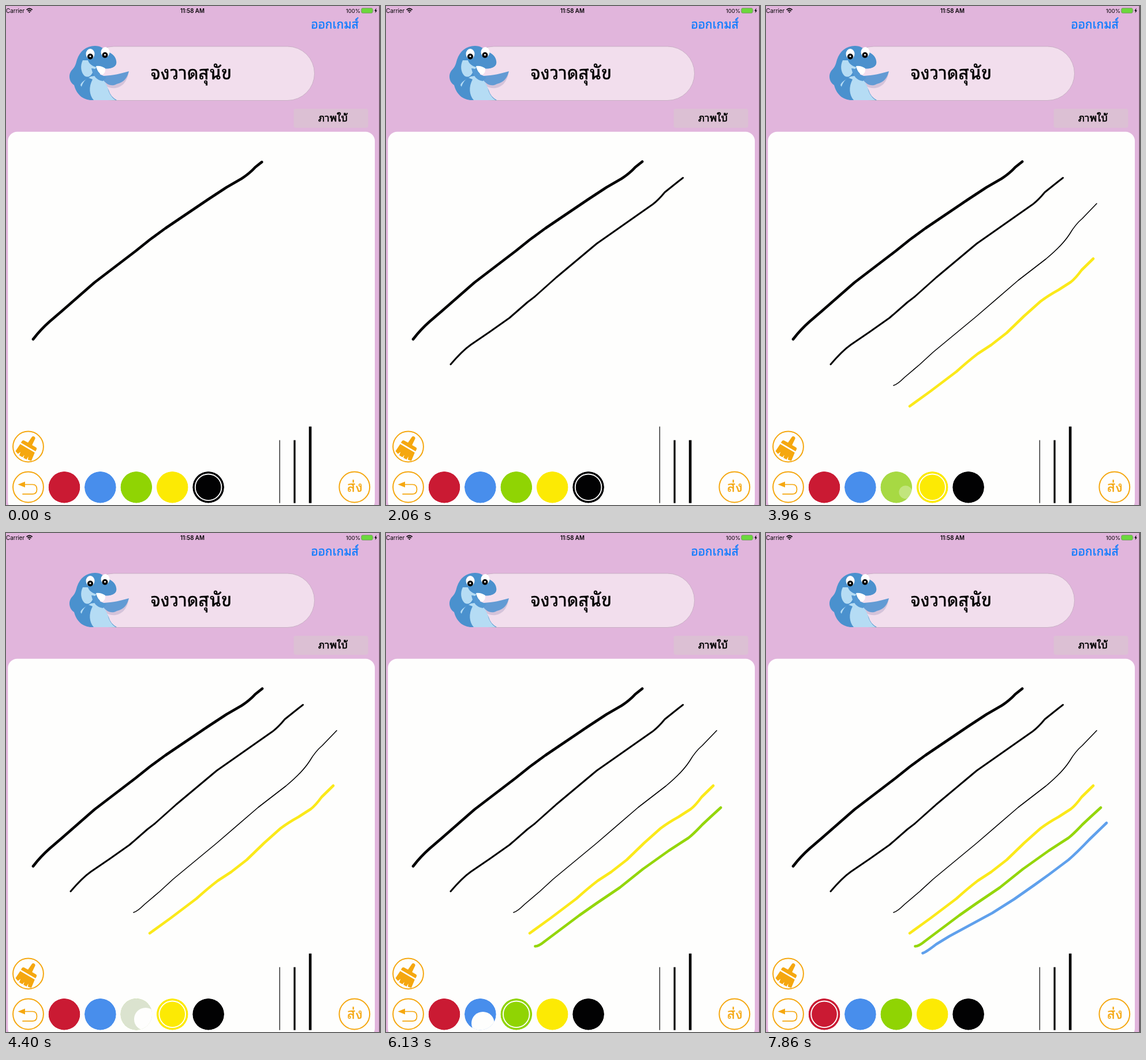
An HTML page for the animation above (8000 ms loop, 648 by 864 pixels).

```html
<!DOCTYPE html>
<html lang="th">
<meta charset="utf-8">
<title>Drawing game</title>
<style>
  html, body { margin: 0; width: 100%; height: 100%; overflow: hidden; background: #e1b5dc; }
  svg { display: block; width: 648px; height: 864px; }
  .thai { font-family: "Noto Sans Thai Looped", "Noto Looped Thai", "Noto Serif Thai", "Noto Sans Thai", "Noto Sans", sans-serif; text-anchor: middle; }
  .status text { font: 9.9px Inter, sans-serif; }
  .line { fill: none; stroke-linecap: round; stroke-linejoin: round; }
  .round { fill: none; stroke: #f5a70f; stroke-width: 2; }
</style>
<svg viewBox="0 0 648 864">
  <rect width="648" height="864" fill="#e1b5dc"/>
  <rect x="646.6" width="1.4" height="864" fill="#55454f"/>

  <g class="status">
    <text x="0" y="11.5">Carrier</text>
    <text x="302" y="11.5" style="font-weight:600;font-size:9.7px">11:58 AM</text>
    <text x="589" y="11.5" style="font-size:9.5px">100%</text>
    <g class="line" stroke="#000" stroke-width="1.7" style="stroke-linecap:butt">
      <path d="M35.6 6.6q5-4.6 10 0M37.6 8.8q3-2.8 6 0"/>
    </g>
    <path d="M39 10.2q1.6-1.3 3.2 0l-1.6 1.7z"/>
    <rect x="615.8" y="3.8" width="19.4" height="8.4" rx="2" fill="#6bd83c" stroke="#6f8f62" stroke-width=".8"/>
    <path d="M636.3 6.4q1.4 1.6 0 3.2z" fill="#6f8f62"/>
    <path d="M641.7 3.6l-3.4 4.9h2l-.7 3.8 3.4-4.9h-2z"/>
  </g>

  <text class="thai" x="570" y="39" font-size="21" fill="#0b7bff" stroke="#0b7bff" stroke-width=".3">ออกเกมส์</text>
  <rect x="140" y="70" width="394.5" height="93.5" rx="46.7" fill="#f2deed" stroke="#c9afc5"/>
  <text class="thai" x="320.5" y="127" font-size="31" stroke="#000" stroke-width=".6">จงวาดสุนัข</text>
  <rect x="498.5" y="178" width="129" height="33" rx="4" fill="#dcc0d4"/>
  <text class="thai" x="566.5" y="200" font-size="17.5" stroke="#000" stroke-width=".6">ภาพใบ้</text>

  <g id="dolphin">
    <path d="M164 126q24 6 48-8-5 21-22 24-18 2-26-16z" fill="#9d91b5" opacity=".35"/>
    <path d="M150 163c-18 0-28-11-32-26-9-6-11-19-3-27 5-5 6-10 8-17 5-15 16-24 31-24 10 0 16 5 22 10 11 4 16 12 15 20-2 8-13 11-24 9l-6 14q12 12 17 24 3 11 14 17z" fill="#4a91ce"/>
    <path d="M133 94c-5 10-3 21 3 27 7 4 12 0 15-8l6-7c-8-2-13-6-15-12z" fill="#b5dcf4"/>
    <path d="M147 122c-7 5-16 8-18 15 3 6 9 9 13 15l5 11h43c-9-6-12-14-14-22-4-10-9-16-15-21z" fill="#b5dcf4"/>
    <path d="M142 124c-11 8-14 21-12 33l16 6h6c-8-9-9-23-2-36z" fill="#4a91ce"/>
    <path d="M164 121c16 0 28-2 49-8-3 12-9 19-21 22-10 6-21 0-28-14z" fill="#629bd4"/>
    <path d="M148 108q9-1 14 10l12 5-6 7q-16-2-20-22z" fill="#5599d4"/>
    <path d="M156 104q9-1 16 4 1 9-6 11-8-4-10-15z" fill="#fff"/>
    <ellipse cx="146" cy="83" rx="7.5" ry="9" fill="#fff"/>
    <ellipse cx="172" cy="80" rx="7.500" ry="9" fill="#fff"/>
    <path d="M152 94c8-8 32-6 39 1 2 8-5 13-14 13-8 0-15-7-25-9z" fill="#4d91cd"/>
    <circle cx="146" cy="87.5" r="5"/><circle cx="171.500" cy="85" r="5"/>
    <circle cx="146" cy="87" r="1.6" fill="#fff"/><circle cx="171.500" cy="84.5" r="1.6" fill="#fff"/>
  </g>

  <rect x="3.3" y="217.7" width="635.7" height="656" rx="16" fill="#fefefd"/>
  <g id="strokes" class="line"></g>
  <g id="bars"></g>

  <circle class="round" cx="38.5" cy="763" r="26.4"/>
  <g transform="translate(38 764.5) rotate(30) scale(1.04)" fill="#f5a70f">
    <path d="M-4-7l1-12a3.2 3.2 0 0 1 6 0l1 12h7q3 0 3 3v3h-28v-3q0-3 3-3z"/>
    <path d="M-14 1.5h28l2 15-6 1-2-5v6h-6l-1-5-1 5h-6l-1-6-2 5-6-2z"/>
  </g>
  <circle class="round" cx="38.5" cy="833" r="26.4"/>
  <path class="line" d="M30 828.5h16q7.5 0 7.5 8.3t-7.5 8.3h-17" stroke="#f5a70f" stroke-width="1.7"/>
  <path d="M20.5 828.5l12.5-5v10z" fill="#f5a70f"/>
  <circle class="round" cx="603.8" cy="833" r="26.4"/>
  <text class="thai" x="604.5" y="841" font-size="24" fill="#f5a70f" stroke="#f5a70f" stroke-width=".3">ส่ง</text>

  <clipPath id="disc"><circle r="27.4"/></clipPath>
  <g id="colors"></g>
</svg>
<script>
const LOOP = 8000;
const byId = id => document.getElementById(id);
const clamp = v => Math.min(1, Math.max(0, v));
const ramp = (t, from, to) => clamp((t - from) / (to - from));
const smooth = u => u * u * (3 - 2 * u);
const easeOut = (u, power) => 1 - (1 - u) ** power;

function add(parent, tag, attrs) {
  const el = document.createElementNS('http://www.w3.org/2000/svg', tag);
  set(el, attrs);
  return parent.appendChild(el);
}
function set(el, attrs) {
  for (const key in attrs) el.setAttribute(key, attrs[key]);
}

// Pen strokes: progress(t) gives the drawn share of the path.
const strokes = [
  { color: '#000', width: 4.6, progress: t => t < 100 ? .998 : 1,
    d: 'M47 577Q60 560 76 546L97 528 153 479 225 424 250 404 276 385 350 335 382 314 408 299Q422 290 432 279L444 269.5' },
  { color: '#000', width: 3, progress: t => easeOut(ramp(t, 880, 1560), 1.7),
    d: 'M112 620.5Q132 597 147 586.5L180 564 214 540 245 513 258 503 295 470 365 411.5 390 394 437 361 462 343.5Q472 336 483 322.500L503 306.5 514.5 297.5' },
  { color: '#000', width: 1.6, progress: t => +(t >= 2260),
    d: 'M221 657Q228 655 240 643L266 621 290 599 365 537 437 475 485 438Q513 415 526 395 536 378 548 368L573 342' },
  { color: '#fbe91a', width: 4.6, progress: t => easeOut(ramp(t, 2600, 3500), 1.7),
    d: 'M249 693L285 667 330 633Q350 615 367 602L390 587 417 566 447 537 475 512Q488 502 507 491.5L528 478Q536 472 547 457L567 437.5' },
  { color: '#94d60b', width: 4.6, progress: t => t < 5100 ? 0 : .944 + .056 * easeOut(ramp(t, 5100, 5260), 1.7),
    d: 'M258.5 715.5Q264 716 275 707L335 662 365 641 405 614 445 582 490 550 524 528Q533 521 548 505L563 491 580 475.5' },
  { color: '#5fa0ec', width: 4.6, progress: t => easeOut(ramp(t, 6180, 7060), 3),
    d: 'M271.5 727.5Q277 726 295 712L318 698 355 678 392 658 430 634 465 609.5 490 591.5 524 566Q538 554 560 531L590 502' },
];
for (const s of strokes)
  s.el = add(byId('strokes'), 'path', { d: s.d, stroke: s.color, 'stroke-width': s.width, pathLength: 1 });

// Width picker: the chosen bar stands taller.
const bars = [[473.6, 1.2], [498.4, 3.2], [524.8, 4.6]]
  .map(([x, width]) => add(byId('bars'), 'rect', { x, width }));

function barHeights(t) {
  if (t >= 2260) return [0, 0, 1];
  const toMedium = smooth(ramp(t, 630, 860)), toThin = smooth(ramp(t, 1830, 2060));
  return [toThin, toMedium - toThin, 1 - toMedium];
}

// Palette: press = [start, backing fade, end, touch dx, touch dy]; chosen = selected span.
const palette = [
  { color: '#ca1a33', chosen: [7560, LOOP], press: [7260, 7420, 7860, 6, 9] },
  { color: '#488eec', chosen: [6160, 7560], press: [5660, 5900, 6460, 4.5, 15.5] },
  { color: '#90d403', chosen: [4630, 6160], press: [3930, 4500, 4930, 16, 8.5] },
  { color: '#fcea04', chosen: [2260, 4630] },
  { color: '#020203', chosen: [0, 2260] },
];
palette.forEach((p, i) => {
  const button = add(byId('colors'), 'g', { transform: `translate(${101 + 62.4 * i} 833.3)`, 'clip-path': 'url(#disc)' });
  add(button, 'circle', { r: 27.4, fill: p.color });
  p.ring = add(button, 'circle', { r: 22.8, fill: 'none', stroke: '#fff', 'stroke-width': 1.9 });
  if (!p.press) return;
  p.backing = add(button, 'circle', { r: 28, fill: '#e6e6ee' });
  p.ripple = add(button, 'circle', { cx: p.press[3], cy: p.press[4], fill: '#fefefd' });
});

function drawPress({ press: [start, fade, end], backing, ripple }, t) {
  set(backing, { opacity: .87 * ramp(t, start, start + 100) * (1 - ramp(t, fade, fade + 200)) });
  set(ripple, {
    r: 10.5 + 10.5 * easeOut(ramp(t, start, start + 700), 2),
    opacity: ramp(t, start, start + 100) * (1 - ramp(t, end - 300, end)),
  });
}

function draw(t) {
  for (const s of strokes) {
    const p = s.progress(t);
    set(s.el, { visibility: p > 0 ? 'visible' : 'hidden', 'stroke-dasharray': p < 1 ? `${p} 2` : 'none' });
  }
  barHeights(t).forEach((share, i) => {
    const height = 109 + 23.5 * share;
    set(bars[i], { y: 860.7 - height, height });
  });
  for (const p of palette) {
    set(p.ring, { visibility: t >= p.chosen[0] && t < p.chosen[1] ? 'visible' : 'hidden' });
    if (p.press) drawPress(p, t);
  }
}

const began = performance.now();
function frame() {
  draw((performance.now() - began) % LOOP);
  requestAnimationFrame(frame);
}
frame();
</script>
</html>
```
